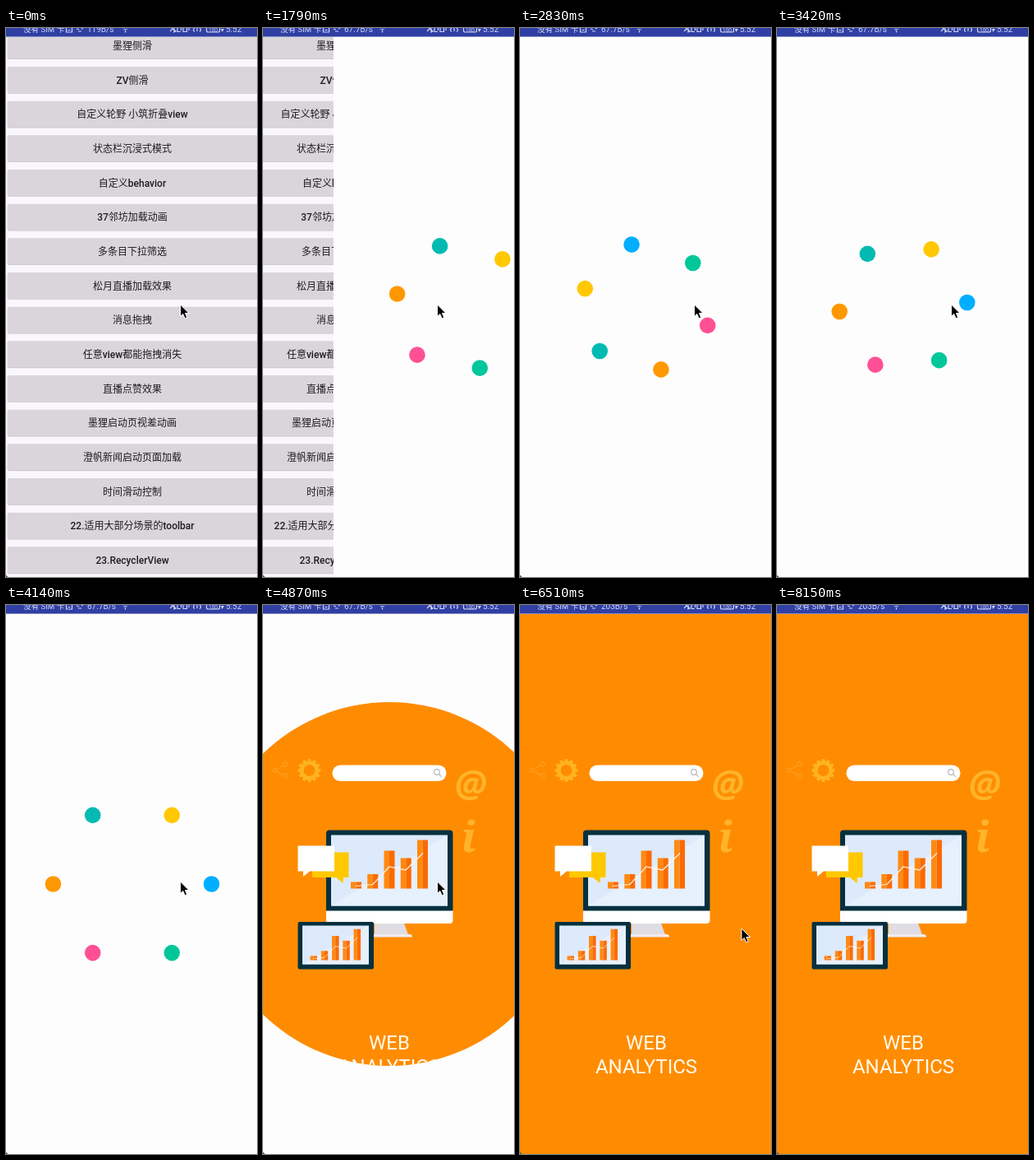
Write an HTML page that moves like this. It is 306 px wide and 667 px high and loops after 9.04 s.

```html
<!DOCTYPE html>
<html lang="zh-CN">
<head>
<meta charset="utf-8">
<title>Splash loader</title>
<style>
html, body { margin: 0; width: 100%; height: 100%; overflow: hidden; background: #fdfdfd; }
svg { display: block; width: 100%; height: 100%; }
text { font-family: Roboto, "Noto Sans CJK SC", "Noto Sans CJK", sans-serif; }
.row { font-size: 12px; font-weight: 500; fill: #1f1c20; text-anchor: middle; }
.title { font-size: 24px; fill: #fffbec; text-anchor: middle; }
.status text { font-size: 10px; fill: #cfd5f5; }
</style>
</head>
<body>
<svg viewBox="0 0 306 667" xmlns="http://www.w3.org/2000/svg">
  <defs>
    <clipPath id="hole"><circle id="holeShape" cx="154" cy="339" r="0"/></clipPath>
    <g id="chart">
      <g id="bars"></g>
      <path d="M6-3 27-5 47-26.500 67-22.500 88-43" fill="none" stroke="#fff3e6" stroke-width="1.200"/>
    </g>
  </defs>

  <g id="list"><rect width="308" height="667" fill="#faf7fc"/></g>

  <g id="splash">
    <rect width="308" height="667" fill="#fdfdfd"/>
    <g id="dots"></g>
    <g id="poster" clip-path="url(#hole)">
      <rect width="308" height="667" fill="#ff8c00"/>
      <g transform="translate(0 -.5)">
        <g fill="none" stroke="#ffa526" stroke-width="1">
          <path d="M16.500 200 25 195.500M16.500 202.500 25 207"/>
          <circle cx="14.300" cy="201.300" r="2.500"/>
          <circle cx="27.500" cy="194" r="2.700"/>
          <circle cx="27.500" cy="208.300" r="2.700"/>
        </g>
        <g id="gear" transform="translate(56.500 201.500)" fill="#ffb320">
          <circle r="9.200" fill="none" stroke="#ffb320" stroke-width="4.600"/>
        </g>
        <rect x="84.500" y="195" width="139" height="19.500" rx="9.700" fill="#fff"/>
        <g fill="none" stroke="#b9b6ba" stroke-width="1.200">
          <circle cx="212" cy="203.500" r="3.300"/><path d="M214.500 206 217.500 209.200"/>
        </g>
        <g fill="#ffb42a" text-anchor="middle" font-weight="700" font-style="italic">
          <text x="253" y="233" font-size="45" style="font-family:'Open Sans',sans-serif">@</text>
          <text x="250.500" y="300" font-size="51" style="font-family:'Noto Serif',serif">i</text>
        </g>

        <path d="M136 387h36l5 14h-41z" fill="#dfdde2"/>
        <path d="M128 400.500h51.500q2.500.5 2.500 3.500h-54z" fill="#f0ecf1"/>
        <path d="M77 371h154.500v12.500q0 4-4 4H81q-4 0-4-4z" fill="#fff"/>
        <path d="M77 372v-94q0-4 4-4h146.500q4 0 4 4v94z" fill="#06303f"/>
        <path d="M83 280h142v86H83z" fill="#dceafc"/>
        <path d="M83 366 225 280v86z" fill="#e7f0fd"/>
        <use href="#chart" transform="translate(107 345)"/>

        <path d="M60 301h44.500v30.500H98l-.5 7-8.500-7H60z" fill="#ffc800"/>
        <path d="M42.500 293H87v31H57l-8 6.500v-6.500h-6.500z" fill="#fff"/>

        <rect x="42.500" y="385.500" width="92.500" height="57.500" rx="2" fill="#06303f"/>
        <path d="M48 390h81v47H48z" fill="#dceafc"/>
        <path d="M48 437 129 390v47z" fill="#e7f0fd"/>
        <use href="#chart" transform="translate(57.500 432) scale(.655 .64)"/>
      </g>
      <text class="title" x="154" y="540.300">WEB</text>
      <text class="title" x="154" y="569.300">ANALYTICS</text>
    </g>
  </g>

  <path d="M0 664.500 2.500 667H0z" fill="#555"/>

  <g class="status">
    <rect width="306" height="11" fill="#858bc8"/>
    <rect width="306" height="10" fill="#303fa3"/>
    <text x="21" y="5.200" style="font-size:9.600px">没有 SIM 卡</text>
    <text id="speed" x="99" y="5.200"></text>
    <text x="268" y="5.200">5:52</text>
    <text x="247" y="4.600" style="font-size:6.500px">100</text>
    <g fill="none" stroke="#cfd5f5" stroke-width="1.200">
      <path d="M73.500-1v6h7v-6M75.500 2.500h3M86 1l3 1M92 1l2-1M88 4h4M142 0q3.500-2 7 0M143.500 2q2-1 4 0M145.500 3v2.500"/>
      <path d="M202 0l5 4-2 1V-1M200 4l3-3M209 0v4.500h4M216-1v5.500h4.500V-1M223 0v3M213.500 0v3M230 0q-3 2 0 4.500M233 0v4M236 0q3 2 0 4.500"/>
      <path d="M244.500-1v4q0 2 2 2h12q2 0 2-2v-4"/>
    </g>
    <path d="M262 1h4l-2.500 4z" fill="#cfd5f5"/>
  </g>

  <path id="cursor" d="M0 0V14.500L3.300 11.500 5.600 16.800 8.200 15.700 6 10.500H10.500Z" fill="#000" stroke="#fff" stroke-width="1"/>
</svg>

<script>
const NS = 'http://www.w3.org/2000/svg';
const $ = id => document.getElementById(id);
const LOOP = 9040, CX = 154, CY = 339;

function add(parent, tag, attrs, text) {
  const el = document.createElementNS(NS, tag);
  for (const k in attrs) el.setAttribute(k, attrs[k]);
  if (text) el.textContent = text;
  return parent.appendChild(el);
}

const labels = ['墨狸侧滑', 'ZV侧滑', '自定义轮野 小筑折叠view', '状态栏沉浸式模式', '自定义behavior',
  '37邻坊加载动画', '多条目下拉筛选', '松月直播加载效果', '消息拖拽', '任意view都能拖拽消失', '直播点赞效果',
  '墨狸启动页视差动画', '澄帆新闻启动页面加载', '时间滑动控制', '22.适用大部分场景的toolbar', '23.RecyclerView'];
labels.forEach((label, i) => {
  const y = 21.7 + i * 41.67;
  add($('list'), 'rect', { x: 1.8, y: y - 15.6, width: 304.4, height: 32, rx: 2, fill: '#c9c5ca' });
  add($('list'), 'rect', { x: 1.8, y: y - 16.4, width: 304.4, height: 32, rx: 2, fill: '#d9d5da' });
  add($('list'), 'text', { class: 'row', x: 154, y: y + 4.4 }, label);
});

[8, 17.5, 46, 37, 59].forEach((h, i) => {
  const x = i * 20.25;
  add($('bars'), 'rect', { x, y: -h, width: 6.5, height: h, fill: '#ff8a12' });
  add($('bars'), 'rect', { x: x + 6.5, y: -h, width: 6.5, height: h, fill: '#fb6a00' });
});

for (let i = 0; i < 12; i++)
  add($('gear'), 'rect', { x: -2, y: -14, width: 4, height: 4, rx: 1, transform: `rotate(${i * 30})` });

const dots = ['#00aeff', '#00c79a', '#ff5095', '#ff9800', '#02bab2', '#ffc800']
  .map(fill => add($('dots'), 'circle', { r: 9.8, fill }));

const ticks = [0, 300, 5470, 5760, 7400, 7550, 7700];
for (const [a, b] of [[1790, 2830], [2970, 4000], [4140, 5170], [6060, 7100]])
  for (let i = 0; i < 8; i++) ticks.push(Math.floor((a + i * (b - a) / 7) / 10) * 10);
ticks.sort((a, b) => a - b);
const hold = t => ticks.filter(k => k <= t).pop();

const part = (t, start, dur) => Math.min(1, Math.max(0, (t - start) / dur));
const smooth = x => (1 - Math.cos(Math.PI * x)) / 2;

const mouse = [[5760, 212.5, 336], [6060, 222, 345], [6500, 270, 393], [6800, 294, 540],
  [7100, 275, 640], [7400, 270, 650], [7700, 268, 668]];
function mouseAt(t) {
  const i = mouse.findIndex(k => k[0] > t);
  if (i === 0) return mouse[0].slice(1);
  if (i < 0) return [268, 690];
  const [a, b] = [mouse[i - 1], mouse[i]], p = (t - a[0]) / (b[0] - a[0]);
  return [a[1] + (b[1] - a[1]) * p, a[2] + (b[2] - a[2]) * p];
}

function move(id, x, y) { $(id).setAttribute('transform', `translate(${x} ${y})`); }

function draw(time) {
  const t = hold(time);
  const left = (1 - part(t, 1640, 318)) ** 2;
  const opened = t >= 1790;
  move('splash', opened ? 308 * left : 308, 0);
  move('list', opened ? -90 * (1 - left) : 0, 0);

  const turn = 2 * Math.PI * smooth(part(t, 1560, 1984));
  const s = part(t, 3640, 1000);
  const radius = 78 * (1 + s * s * (2.9 - 3.9 * s)); // swings out, then collapses
  dots.forEach((dot, i) => {
    const a = turn + i * Math.PI / 3;
    dot.setAttribute('cx', CX + radius * Math.cos(a));
    dot.setAttribute('cy', CY + radius * Math.sin(a));
  });

  const grow = part(t, 4640, 416);
  $('poster').style.display = grow > 0 ? '' : 'none';
  $('holeShape').setAttribute('r', grow < 1 ? 10 + 362 * smooth(grow) : 400);

  $('speed').textContent = t < 300 ? '119B/s' : t < 5470 ? '67.7B/s' : '203B/s';
  move('cursor', ...mouseAt(t));
}

const began = performance.now();
function frame() {
  draw((performance.now() - began) % LOOP);
  requestAnimationFrame(frame);
}
frame();
</script>
</body>
</html>
```
